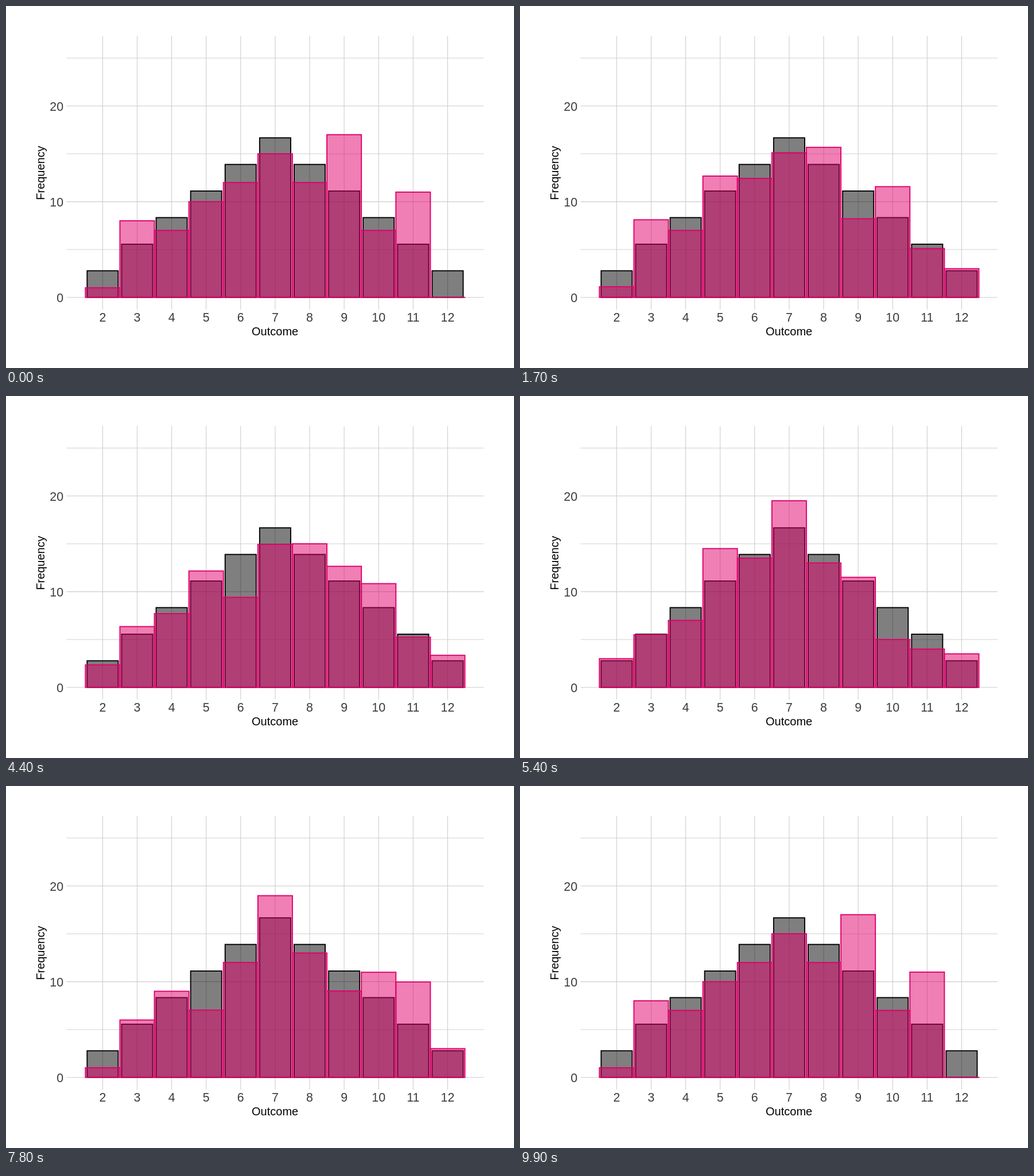
Write an HTML page that moves like this. It is 885 by 632 pixels and loops after 10000 ms.

```html
<!DOCTYPE html>
<html lang="en">
<head>
<meta charset="utf-8">
<title>Dice totals</title>
<style>
  html, body { margin: 0; width: 100%; height: 100%; overflow: hidden; background: #fff; }
  svg { display: block; font-family: "Liberation Sans", Arial, sans-serif; }
  .grid { stroke: #cccccc; stroke-width: 1.07; }
  .minor { stroke-width: 0.9; }
  .expected { fill: rgba(0, 0, 0, .5); stroke: #000; stroke-width: 1.9; }
  .rolled { fill: rgba(223, 0, 107, .5); stroke: #df006b; stroke-width: 1.9; }
  .tick { font-size: 21.3px; fill: #3c3c3c; }
  .title { font-size: 20px; text-anchor: middle; }
</style>
</head>
<body>
<svg id="chart" width="885" height="632" viewBox="0 0 885 632"></svg>
<script>
const STEP = 100, FRAMES = 100;
const LEFT = 105.5, RIGHT = 832, TOP = 52.5, BOTTOM = 530;
const chart = document.getElementById('chart');

const xOf = outcome => 168.4 + (outcome - 2) * 60.1;
const yOf = value => 508.7 - value * 16.71;

// Counts of totals 2 to 12, one row per series of 100 rolls.
const series = [
  [1, 8, 7, 10, 12, 15, 12, 17, 7, 11, 0],
  [2, 9, 7, 10, 16, 16, 13, 10, 8, 6, 3],
  [1, 8, 7, 13, 12, 15, 16, 8, 12, 5, 3],
  [4, 6, 7, 8, 6, 22, 17, 8, 10, 8, 4],
  [2, 6, 7, 9, 8, 16, 15, 13, 14, 7, 3],
  [3, 7, 9, 18, 12, 13, 15, 12, 5, 2, 4],
  [3, 4, 5, 11, 15, 26, 11, 11, 5, 6, 3],
  [3, 5, 8, 14, 13, 15, 12, 17, 7, 2, 4],
  [1, 6, 9, 7, 12, 19, 13, 9, 11, 10, 3],
  [3, 6, 8, 11, 14, 16, 14, 12, 9, 5, 2]
];
const keyFrames = [0, 10, 20, 30, 40, 49, 59, 69, 79, 89, 99];
const outcomes = series[0].map((_, i) => i + 2);

function add(tag, attrs, text = '') {
  const el = document.createElementNS('http://www.w3.org/2000/svg', tag);
  for (const name in attrs) el.setAttribute(name, attrs[name]);
  el.textContent = text;
  return chart.appendChild(el);
}

function addBar(className, outcome, width) {
  return add('rect', { class: className, x: xOf(outcome) - width * 30.05, width: width * 60.1 });
}

function setHeight(bar, value) {
  bar.setAttribute('y', yOf(value));
  bar.setAttribute('height', yOf(0) - yOf(value));
}

for (let v = 0; v <= 25; v += 5) {
  add('line', { class: v % 10 ? 'grid minor' : 'grid', x1: LEFT, x2: RIGHT, y1: yOf(v), y2: yOf(v) });
  if (v % 10 === 0) add('text', { class: 'tick', x: 100, y: yOf(v) + 8, 'text-anchor': 'end' }, v);
}
for (const n of outcomes) {
  add('line', { class: 'grid', x1: xOf(n), x2: xOf(n), y1: TOP, y2: BOTTOM });
  add('text', { class: 'tick', x: xOf(n), y: 551.3, 'text-anchor': 'middle' }, n);
}
add('text', { class: 'title', x: 468.6, y: 575.3 }, 'Outcome');
add('text', { class: 'title', transform: 'translate(67 291.5) rotate(-90)' }, 'Frequency');

for (const n of outcomes) {
  setHeight(addBar('expected', n, 0.9), (6 - Math.abs(n - 7)) / 36 * 100);
}
const rolled = outcomes.map(n => addBar('rolled', n, 1));

const cubicInOut = t => t < 0.5 ? 4 * t ** 3 : 1 - 4 * (1 - t) ** 3;

function render(ms) {
  const frame = Math.floor(ms / STEP) % FRAMES;
  const k = Math.min(keyFrames.findLastIndex(f => f <= frame), series.length - 1);
  const mix = cubicInOut((frame - keyFrames[k]) / (keyFrames[k + 1] - keyFrames[k]));
  const from = series[k], to = series[(k + 1) % series.length];
  rolled.forEach((bar, i) => setHeight(bar, from[i] + (to[i] - from[i]) * mix));
  // A zero-height rect is not painted, so keep its outline as a flat line.
  rolled.forEach(bar => {
    if (+bar.getAttribute('height') === 0) bar.setAttribute('height', 0.01);
  });
}

const start = performance.now();
function tick() {
  render(performance.now() - start);
  requestAnimationFrame(tick);
}
tick();
</script>
</body>
</html>
```
